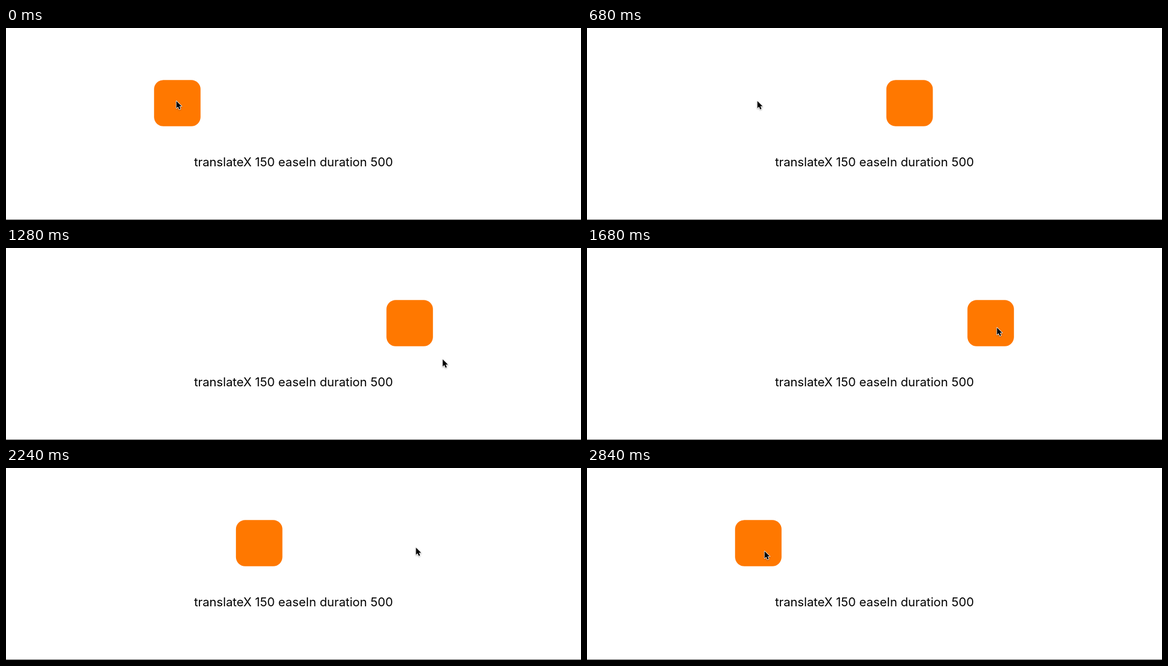
These frames come from a looping animation (960 by 322 pixels, 2.88 s). An HTML page:

```html
<!DOCTYPE html>
<html lang="en">
<head>
<meta charset="utf-8">
<title>translateX easeIn</title>
<style>
  html, body { margin: 0; width: 100%; height: 100%; overflow: hidden; background: #fff; }
  svg { display: block; width: 960px; height: 322px; }
  text { font: 400 20.3px Montserrat, Inter, sans-serif; text-anchor: middle; }
  #cursor { filter: drop-shadow(0 1px 1px rgba(0, 0, 0, .3)); }
</style>
</head>
<body>
<svg viewBox="0 0 960 322">
  <rect y="321" width="960" height="1" fill="#666"/>
  <rect id="box" y="87.2" width="77.6" height="77.6" rx="15.5" fill="#ff7800"/>
  <text x="480" y="232">translateX 150 easeIn duration 500</text>
  <g id="cursor">
    <path d="M0 0V12L2.7 9.5L4.7 14L6.8 13.1L4.9 8.7H8.7Z"
      stroke="#fff" stroke-width="1.6" stroke-linejoin="round" paint-order="stroke"/>
  </g>
</svg>
<script>
  const LOOP = 2880, STEP = 40, DURATION = 497;
  const LEFT = 247.2, TRAVEL = 388, FORTH = 279, BACK = 1840;

  const rest = { x: 284.5, y: 122.5 };
  const glides = [
    { start: 1099, end: 1328, x: 786, y: 195 },
    { start: 1360, end: 1680, x: 684.5, y: 133.5 },
    { start: 2600, end: 2840, x: 296.5, y: 139.5 }
  ];

  const box = document.getElementById("box");
  const cursor = document.getElementById("cursor");

  const progress = (time, start, end) =>
    Math.min(1, Math.max(0, (time - start) / (end - start)));
  const easeIn = p => p * p;
  const easeInOut = p => p * p * (3 - 2 * p);
  const slide = (time, start) => easeIn(progress(time, start, start + DURATION));

  const pointerAt = time => glides.reduce((from, to) => {
    const k = easeInOut(progress(time, to.start, to.end));
    return { x: from.x + (to.x - from.x) * k, y: from.y + (to.y - from.y) * k };
  }, rest);

  function draw(now) {
    const time = Math.floor((now % LOOP) / STEP) * STEP;
    const { x, y } = pointerAt(time);
    box.setAttribute("x", LEFT + TRAVEL * (slide(time, FORTH) - slide(time, BACK)));
    cursor.setAttribute("transform", `translate(${x} ${y})`);
  }

  const start = performance.now();
  function tick() {
    draw(performance.now() - start);
    requestAnimationFrame(tick);
  }
  tick();
</script>
</body>
</html>
```
